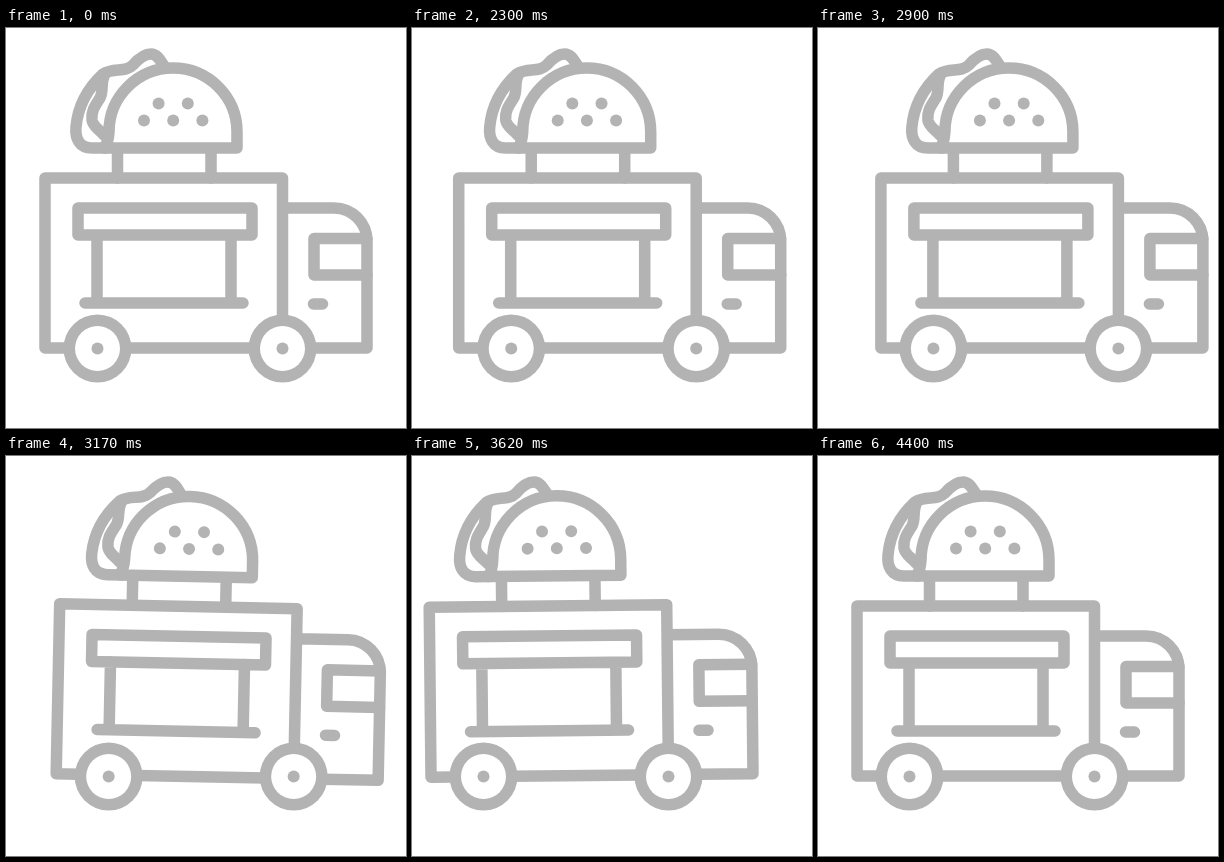
Recreate the animation shown at these times as an HTML page with a canvas. Size 400 by 400 pixels, loop 4430 ms.

```html
<!DOCTYPE html>
<html lang="en">
<head>
<meta charset="utf-8">
<title>Taco truck</title>
<style>
  html, body { margin: 0; width: 100%; height: 100%; overflow: hidden; background: #fff; }
  canvas { display: block; width: 400px; height: 400px; }
</style>
</head>
<body>
<canvas id="stage" width="400" height="400"></canvas>
<script>
const ctx = document.getElementById('stage').getContext('2d');
const LOOP = 4430, REST = 2030, STEP = 30;
const DRIVE_START = 2000, DRIVE_TIME = 2400;
const GREY = '#b3b3b3';
const PIVOT = { x: 150, y: 320 };

const body = new Path2D(
  'M60 320H39V150H276.5V290 M120 320H248 M277 180H328A33 33 0 0 1 361 213V320H306');
const cabDetails = new Path2D('M361 210.5H308V247H361 M307.5 276H316.5');
const counter = new Path2D('M72 180H246V207H72Z M91 207V275 M225 207V275 M79 275H237');
const supports = new Path2D('M111.5 120V150 M205 120V150');
const shell = new Path2D('M231 120V104A64 64 0 0 0 103 104C102.5 111 101 116 99 120Z');
const leaf = new Path2D(
  'M100 120H86C73 120 69 110 70 99C72 77 83 59 97 46C108 39 119 45 127 37' +
  'C134 29 139 26 145 26C151 26 154 32 158 38');
const leafFold = new Path2D('M99 46C94 55 98 62 94 70C89 78 85 83 86 92C87 99 93 101 98 107');

const ease = u => (1 - Math.cos(Math.PI * u)) / 2;
const between = (a, b, u) => a + (b - a) * ease(u);

// Forward, back past the start, then home; u runs from 0 to 1 over the drive.
function offset(u) {
  const front = 25, back = -26.5, turn = 1 / 3, farTurn = 7 / 9;
  if (u < turn) return between(0, front, u / turn);
  if (u < farTurn) return between(front, back, (u - turn) / (farTurn - turn));
  return between(back, 0, (u - farTurn) / (1 - farTurn));
}

// Two rocks of the body, strongest halfway through the drive.
function tilt(u) {
  const degrees = 1.2 * Math.sin(Math.PI * u) * Math.cos(4 * Math.PI * u);
  return degrees * Math.PI / 180;
}

function disc(x, y, r, colour) {
  ctx.fillStyle = colour;
  ctx.beginPath();
  ctx.arc(x, y, r, 0, Math.PI * 2);
  ctx.fill();
}

function wheel(x) {
  const y = 320.5;
  disc(x, y, 34, GREY);
  disc(x, y, 22.5, '#fff');
  disc(x, y, 6, GREY);
}

function taco() {
  ctx.stroke(leaf);
  ctx.stroke(leafFold);
  ctx.fillStyle = '#fff';
  ctx.fill(shell);
  ctx.stroke(shell);
  for (let i = 0; i < 5; i++) disc(138 + 14.6 * i, i % 2 ? 75.5 : 92.5, 6, GREY);
}

function draw(u) {
  ctx.setTransform(1, 0, 0, 1, 0, 0);
  ctx.fillStyle = '#fff';
  ctx.fillRect(0, 0, 400, 400);
  ctx.translate(offset(u), 0);
  ctx.strokeStyle = GREY;
  ctx.lineWidth = 11.5;
  ctx.lineCap = ctx.lineJoin = 'round';

  ctx.save();
  ctx.translate(PIVOT.x, PIVOT.y);
  ctx.rotate(tilt(u));
  ctx.translate(-PIVOT.x, -PIVOT.y);
  for (const part of [body, cabDetails, counter, supports]) ctx.stroke(part);
  taco();
  ctx.restore();

  wheel(91.5);
  wheel(276.5);
}

const origin = performance.now();
function tick() {
  const t = (performance.now() - origin) % LOOP;
  const stepped = REST + Math.floor((t - REST) / STEP) * STEP;
  draw(t < REST ? 0 : (stepped - DRIVE_START) / DRIVE_TIME);
  requestAnimationFrame(tick);
}
tick();
</script>
</body>
</html>
```
